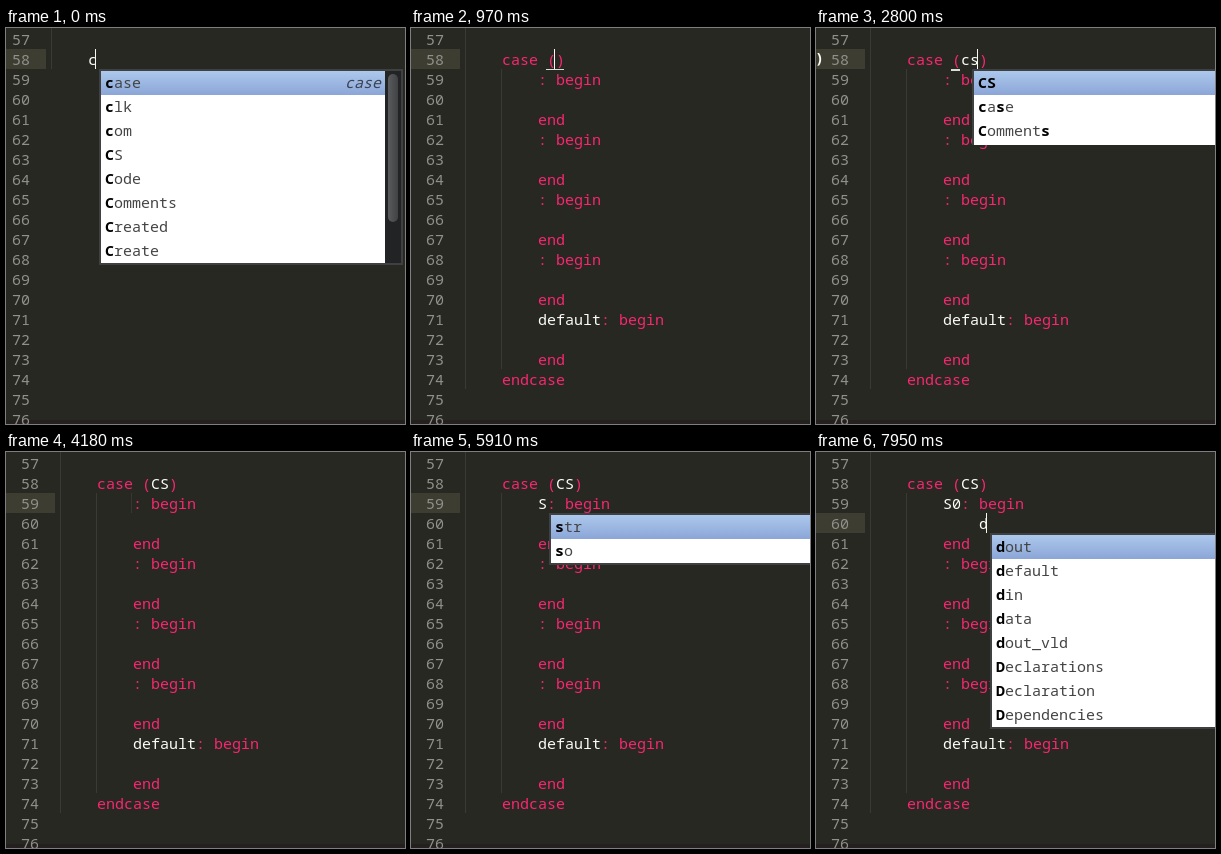
An HTML page with a canvas that plays this animation: 399x396 px, repeating every 8000 ms.

```html
<!DOCTYPE html>
<html lang="en">
<head>
<meta charset="utf-8">
<title>Code completion</title>
<style>
html, body { margin: 0; width: 100%; height: 100%; overflow: hidden; background: #272822; }
canvas { display: block; }
</style>
</head>
<body>
<canvas id="stage" width="399" height="396"></canvas>
<script>
const ctx = document.getElementById('stage').getContext('2d');
const LOOP = 8000, CHAR = 9, LINE = 20, ROW = 24, FIRST = 57;
const FONT = '15px "Noto Sans Mono", "DejaVu Sans Mono", monospace';
const PINK = '#f92672', WHITE = '#fcfcf8';

// Completion rows: letters between asterisks are the matched ones.
const LISTS = {
  c: ['*c*ase', '*c*lk', '*c*om', '*C*S', '*C*ode', '*C*omments', '*C*reated', '*C*reate'],
  ca: ['*ca*se', '*C*re*a*ted', '*C*re*a*te'],
  cs: ['*CS*', '*c*a*s*e', '*C*omment*s*'],
  s: ['*s*tr', '*s*o'],
  d: ['*d*out', '*d*efault', '*d*in', '*d*ata', '*d*out_vld',
      '*D*eclarations', '*D*eclaration', '*D*ependencies']
};

// Each entry changes part of the editor state from its time on.
const EVENTS = [
  [0, { word: 'c', expanded: false, line: 58, col: 5, caret: 1, marks: false, icon: false,
        subject: '', label: '', body: '', list: 'c', listCol: 4, edge: true }],
  [250, { word: 'ca', col: 6 }],
  [370, { list: 'ca' }],
  [680, { expanded: true, col: 10, list: '' }],
  [970, { marks: true }],
  [1100, { icon: true }],
  [1230, { caret: 0.5 }],
  [1360, { caret: 0 }],
  [1910, { subject: 'c', col: 11, caret: 1 }],
  [2030, { list: 'c', listCol: 10 }],
  [2340, { caret: 0.5 }],
  [2500, { caret: 0 }],
  [2800, { subject: 'cs', col: 12, caret: 1, list: 'cs', edge: false }],
  [2930, { edge: true }],
  [3240, { subject: 'CS', list: '' }],
  [3510, { line: 59, col: 8 }],
  [3630, { marks: false, icon: false }],
  [4030, { caret: 0.5 }],
  [4180, { caret: 0.07 }],
  [4790, { caret: 0.5 }],
  [4910, { caret: 1 }],
  [5270, { caret: 0.5 }],
  [5390, { label: 'S', col: 9, caret: 1 }],
  [5520, { list: 's', listCol: 8 }],
  [5790, { caret: 0.5 }],
  [5910, { caret: 0 }],
  [6060, { label: 'S0', col: 10, caret: 1, list: '' }],
  [6350, { caret: 0.5 }],
  [6480, { caret: 0 }],
  [6730, { line: 60, col: 12, caret: 1 }],
  [7160, { caret: 0.5 }],
  [7280, { caret: 0 }],
  [7810, { body: 'd', col: 13, caret: 1 }],
  [7950, { list: 'd', listCol: 12 }]
];

const stateAt = t =>
  Object.assign({}, ...EVENTS.filter(e => e[0] <= t).map(e => e[1]));

const lineTop = n => 1 + (n - FIRST) * LINE;

function rect(x, y, w, h, fill) {
  ctx.fillStyle = fill;
  ctx.fillRect(x, y, w, h);
}

function text(str, x, y, fill, style = '') {
  ctx.font = style + ' ' + FONT;
  ctx.fillStyle = fill;
  ctx.fillText(str, x, y);
}

function gradient(x0, y0, x1, y1, a, b) {
  const g = ctx.createLinearGradient(x0, y0, x1, y1);
  g.addColorStop(0, a);
  g.addColorStop(1, b);
  return g;
}

// Draws [text, colour] runs one after another.
function code(left, n, col, ...runs) {
  for (const [str, fill] of runs) {
    text(str, left + 1 + col * CHAR, lineTop(n) + 16, fill);
    col += str.length;
  }
}

function drawGutter(s, left) {
  rect(0, lineTop(s.line), left - 5, LINE, '#3e3d32');
  for (let n = FIRST; n <= 76; n++) {
    text(String(n), left - 39, lineTop(n) + 16, '#90918b');
  }
  if (s.icon) text(')', -1, lineTop(58) + 14, WHITE, 'bold');
}

function drawCode(s, left) {
  const guide = '#393a34';
  if (!s.expanded) {
    rect(left, 0, 1, 41, guide);
    code(left, 58, 4, [s.word, WHITE]);
    return;
  }
  rect(left, 0, 1, 361, guide);
  rect(left + 36, 41, 1, 300, guide);
  code(left, 58, 4, ['case (', PINK], [s.subject, WHITE], [')', PINK]);
  [s.label, '', '', '', 'default'].forEach((label, i) => {
    const n = 59 + i * 3;
    code(left, n, 8, [label, WHITE], [': begin', PINK]);
    code(left, n + 2, 8, ['end', PINK]);
  });
  code(left, 60, 12, [s.body, WHITE]);
  code(left, 74, 4, ['endcase', PINK]);
  if (s.marks) {
    for (const col of [9, 10 + s.subject.length]) {
      rect(left + col * CHAR, 41, CHAR, s.icon ? 2 : 1, '#dcdcd6');
    }
  }
}

function drawCaret(s, left) {
  ctx.globalAlpha = s.caret;
  rect(left + s.col * CHAR - 1, lineTop(s.line), 1, LINE, '#f8f8f0');
  ctx.globalAlpha = 1;
}

function drawPopup(s, left) {
  const rows = LISTS[s.list];
  const x = left + s.listCol * CHAR + 12, y = lineTop(s.line) + LINE;
  const h = rows.length * ROW, scroll = rows.length > 7;
  const w = scroll ? 284 : 300;
  rect(x, y, 304, h + 4, '#3f4042');
  rect(x + 2, y + 2, w, s.edge ? h : h + 2, '#ffffff');
  rect(x + 2, y + 2, w, ROW, gradient(0, y + 2, 0, y + 2 + ROW, '#acc8ec', '#8ba6d7'));
  rows.forEach((row, i) => {
    const base = y + 19 + i * ROW;
    let tx = x + 6;
    row.split('*').forEach((part, k) => {
      const hit = k % 2;
      text(part, tx, base, hit ? '#000000' : '#444444', hit ? 'bold' : '');
      tx += part.length * CHAR;
    });
  });
  if (rows[0].replaceAll('*', '') === 'case') {
    text('case', x + w - 38, y + 19, '#3c4250', 'italic');
  }
  if (scroll) {
    const sx = x + 2 + w;
    rect(sx, y + 2, 16, h, '#222324');
    ctx.fillStyle = gradient(sx + 3, 0, sx + 13, 0, '#5a5b5d', '#414244');
    ctx.beginPath();
    ctx.roundRect(sx + 3, y + 5, 10, 148, 5);
    ctx.fill();
  }
}

function draw(t) {
  const s = stateAt(t);
  const left = s.expanded ? 54 : 45;
  rect(0, 0, 399, 396, '#272822');
  rect(0, 392, 399, 4, '#252020');
  drawGutter(s, left);
  drawCode(s, left);
  drawCaret(s, left);
  if (s.list) drawPopup(s, left);
}

const start = performance.now();
function tick() {
  draw((performance.now() - start) % LOOP);
  requestAnimationFrame(tick);
}
tick();
</script>
</body>
</html>
```
